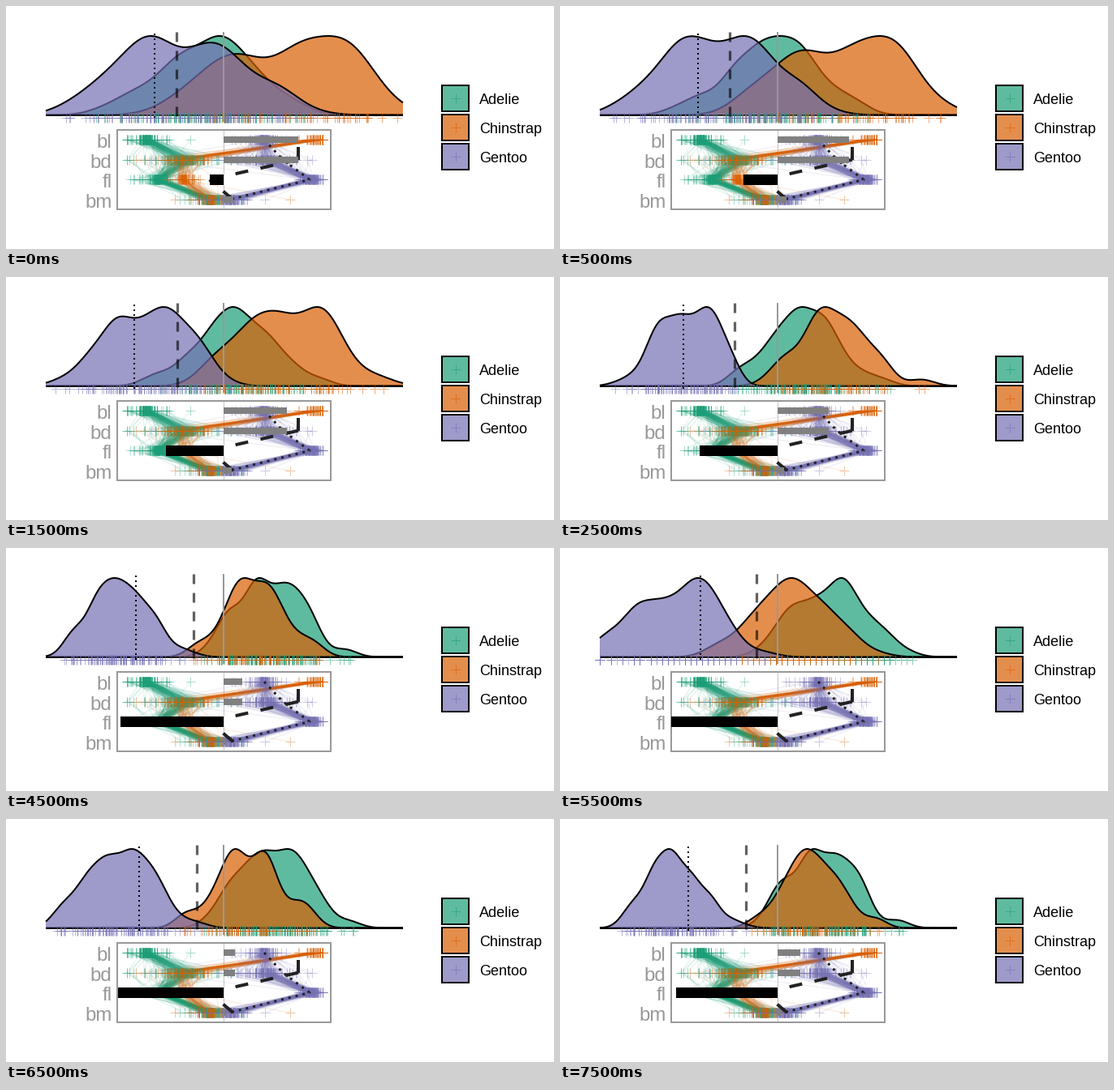
Animation, 675 px wide and 300 px high, one loop 8000 ms. Source, as a matplotlib script:

```python
import numpy as np
import matplotlib.pyplot as plt
from matplotlib.animation import FuncAnimation
from matplotlib.collections import LineCollection
from matplotlib.patches import Polygon, Rectangle

W, H, DPI = 675, 300, 100
PT = 72 / DPI                       # points per pixel
LEFT, RIGHT, BASE, PEAK = 49, 489, 134.5, 97.5
CENTER, SCALE = 257, 98             # projected data: zero and one deviation
MID, UNIT = 268, 131.5              # basis panel: zero and unit length
ROWS = 165 + 24.7 * np.arange(4)    # bl, bd, fl, bm
FL = 2

# Standardised measurements; each species has a small and a large sex.
SEX_GAP = np.array([0.35, 0.39, 0.28, 0.40])
SPREAD = np.array([0.42, 0.40, 0.38, 0.39])
FL_MEAN, FL_SD = 201.29, 14         # mm, recorded as whole numbers

SPECIES = [
    dict(name="Adelie", color="#1b9e77", n=146, mean=[-0.80, 0.60, -0.78, -0.62],
         gap=0.7, large=0.58, corr=0.0, paths=[172, 219, 188, 253]),
    dict(name="Chinstrap", color="#d95f02", n=68, mean=[0.70, 0.64, -0.30, -0.59],
         gap=1.15, large=0.6, corr=0.25, paths=[383, 216, 220, 253]),
    dict(name="Gentoo", color="#7570b3", n=120, mean=[0.60, -1.10, 1.16, 1.08],
         gap=0.95, large=0.42, corr=0.45, paths=[318, 322, 376, 277]),
]
PATH_SPREAD = [6, 12, 5, 6]

rng = np.random.default_rng(7)
grid = np.linspace(LEFT, RIGHT, 441)

plt.rcParams["font.family"] = "Liberation Sans"
fig = plt.figure(figsize=(W / DPI, H / DPI), dpi=DPI, facecolor="white")
ax = fig.add_axes([0, 0, 1, 1])
ax.set_xlim(0, W)
ax.set_ylim(H, 0)
ax.axis("off")


def white_noise(n, dims):
    """Normal draws with exactly zero mean and unit covariance."""
    z = rng.normal(size=(n, dims))
    z -= z.mean(axis=0)
    return z @ np.linalg.inv(np.linalg.cholesky(np.cov(z.T))).T


def measure(sp):
    n, r = sp["n"], sp["corr"]
    sex = np.where(np.arange(n) < sp["large"] * n, 1.0, -1.0)
    sex -= sex.mean()
    z = white_noise(n, 5)
    noise = np.sqrt(r) * z[:, :1] + np.sqrt(1 - r) * z[:, 1:]
    data = sp["mean"] + np.outer(sex, sp["gap"] * SEX_GAP) + SPREAD * noise
    mm = np.round(FL_MEAN + FL_SD * data[:, FL]).clip(172, 231)
    data[:, FL] = (mm - FL_MEAN) / FL_SD
    return data


def tour_angle(step):
    """Turn evenly up to pure fl at step 6, then slower back."""
    if step <= 6:
        return np.radians(max(7.6, 90 - 14.27 * (6 - step)))
    return np.radians(90 - 8.7 * (step - 6))


def basis(angle):
    c, s = np.cos(angle), np.sin(angle)
    return np.array([0.705 * c, 0.705 * c, -s, 0.09 * c])


def density(xs):
    """Gaussian kernel estimate with the rule-of-thumb bandwidth."""
    iqr = np.subtract(*np.percentile(xs, [75, 25]))
    width = 0.9 * min(xs.std(ddof=1), iqr / 1.34) * len(xs) ** -0.2
    total = np.exp(-0.5 * ((grid[:, None] - xs) / width) ** 2).sum(axis=1)
    return total / total.max()


def line(xs, ys, width, color="black", **kw):
    kw.setdefault("solid_capstyle", "butt")
    return ax.plot(xs, ys, color=color, lw=width * PT, **kw)[0]


def crosses(xs, ys, color, alpha, z):
    return ax.plot(xs, ys, "+", color=color, alpha=alpha, ms=12 * PT,
                   mew=PT, zorder=z)[0]


def bar(row):
    height, color = (13, "black") if row == FL else (8, "#808080")
    return ax.add_patch(Rectangle((MID, ROWS[row] - height / 2), 0, height,
                                  fc=color, ec="none", zorder=9))


def draw_bundle(sp):
    n = sp["n"]
    xs = sp["paths"] + rng.standard_t(2.2, (n, 4)) * PATH_SPREAD
    xs = xs.clip(149, 390)
    paths = [np.column_stack([x, ROWS]) for x in xs]
    ax.add_collection(LineCollection(paths, colors=sp["color"], alpha=0.1,
                                     linewidths=1.5 * PT, zorder=2))
    for x, y in zip(xs.T, ROWS):
        crosses(x, np.full(n, y), sp["color"], 0.35, 3)


def draw_panel():
    line([MID, MID], [153, 250], 1, "#c4c4c4", zorder=1)
    for sp in SPECIES:
        draw_bundle(sp)
    line([318, 341, 374, 275], ROWS, 3, "#222222", ls=(0, (1, 2)), zorder=4)
    start = MID + UNIT * basis(tour_angle(0))
    for a, b in [(1, 0), (1, 2), (3, 2)]:
        line(start[[a, b]], ROWS[[a, b]], 4, "#222222", ls=(0, (4, 3.9)),
             dash_capstyle="butt", zorder=5)
    ax.add_patch(Rectangle((137, 153), 263, 97.5, fill=False, ec="#999999",
                           lw=2 * PT, zorder=8))
    for name, y in zip(["bl", "bd", "fl", "bm"], ROWS):
        ax.text(130.5, y + 10, name, size=24 * PT, color="#999999",
                ha="right", va="baseline")


def draw_legend():
    for i, sp in enumerate(SPECIES):
        y = 114.2 + 36 * i
        box = dict(xy=(537, y - 16.7), width=33, height=32.5)
        ax.add_patch(Rectangle(**box, fc=sp["color"], ec="none", alpha=0.7))
        ax.add_patch(Rectangle(**box, fill=False, ec="black", lw=2 * PT))
        crosses([553.5], [y], sp["color"], 0.6, 3)
        ax.text(583, y + 6.8, sp["name"], size=18 * PT, va="baseline")


draw_panel()
draw_legend()

samples = [measure(sp) for sp in SPECIES]
fills, curves, rugs = [], [], []
for k, sp in enumerate(SPECIES):
    z = 2 + 0.1 * k
    fills.append(ax.add_patch(Polygon([(0, 0), (1, 1)], fc=sp["color"],
                                      ec="none", alpha=0.7, zorder=z)))
    curves.append(line([], [], 2, zorder=z + 0.05, solid_joinstyle="round"))
    rugs.append(crosses([], [], sp["color"], 0.5, 4))
line([LEFT, RIGHT], [BASE, BASE], 1.5, zorder=3)
line([MID, MID], [32, 143], 2, "#999999", zorder=6)
dashed = line([], [], 3.2, alpha=0.62, ls=(0, (12 / 3.2, 11 / 3.2)), zorder=5)
dotted = line([], [], 2, ls=(0, (1, 2)), zorder=5)
# Each marked observation: its pixel offset along the start basis and along fl.
marks = [(dashed, 32, -45.5, 15), (dotted, 34, -63.6, 84)]
bars = [bar(row) for row in range(4)]


def update(frame):
    angle = tour_angle((frame + 1) // 2)
    weights = basis(angle)
    for data, fill, curve, rug in zip(samples, fills, curves, rugs):
        xs = CENTER + SCALE * data @ weights
        ys = BASE - PEAK * density(xs)
        outline = np.column_stack([grid, ys])
        fill.set_xy(np.vstack([outline, [(RIGHT, BASE), (LEFT, BASE)]]))
        curve.set_data(grid, ys)
        rug.set_data(xs, np.full(len(xs), 137.5))
    for mark, top, rest, fl in marks:
        x = CENTER + rest * np.cos(angle) - fl * np.sin(angle)
        mark.set_data([x, x], [top, 139])
    for patch, weight in zip(bars, weights):
        patch.set_width(weight * UNIT)
    return [*fills, *curves, *rugs, dashed, dotted, *bars]


anim = FuncAnimation(fig, update, frames=16, interval=500, repeat=True,
                     repeat_delay=0, blit=False)
plt.show()
```
